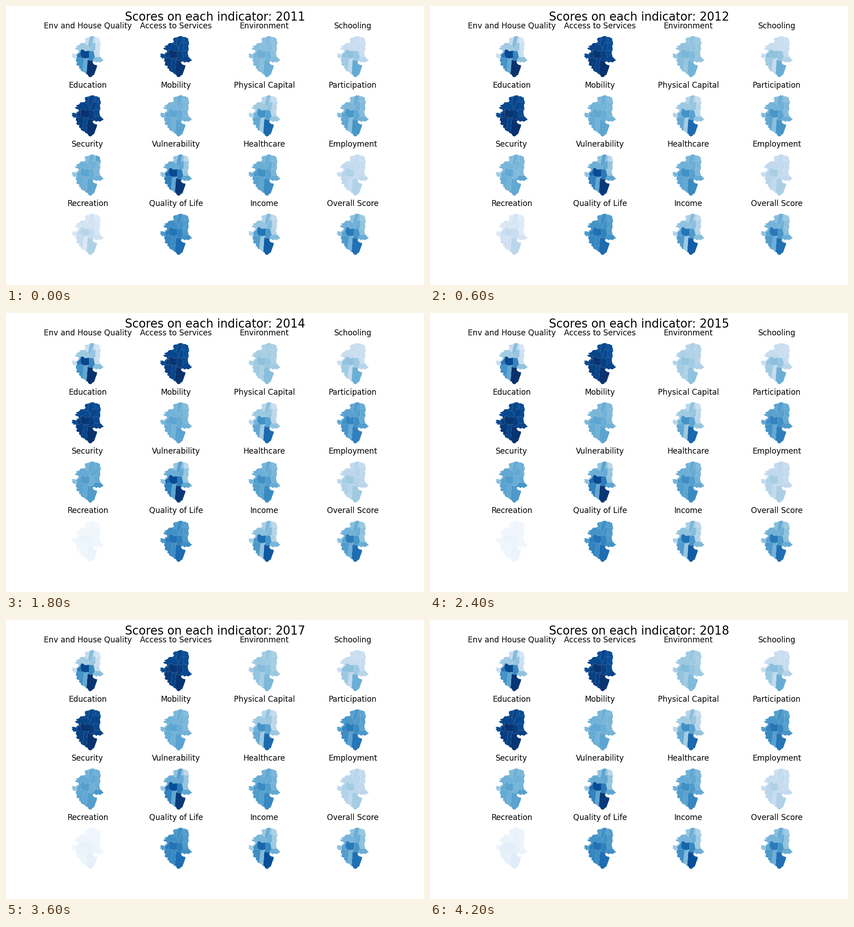
Write a matplotlib script that moves like this. It is 917 px wide and 611 px high and loops after 4800 ms.

```python
import numpy as np
import matplotlib.pyplot as plt
from matplotlib.animation import FuncAnimation
from matplotlib.collections import PolyCollection
from matplotlib.path import Path

WIDTH, HEIGHT = 917, 611
YEARS = range(2011, 2019)
LEFT, TOP = 144, 66
COL_STEP, ROW_STEP = 193.8, 129.7

# City border, clockwise from the north-west corner
EAST = [(29, 5), (33, 3), (37, 3), (38, 1.5), (41, 1.5), (42, 0), (49, 0),
        (51, 2), (56, 2), (59, 4), (62, 5), (62, 9), (63.5, 13), (64, 17),
        (62, 21), (62.5, 25), (63, 30), (61, 34), (61, 39), (62, 42),
        (63, 46), (66, 48), (67, 50.5), (70, 51.5), (69, 54), (66, 55),
        (64, 57), (61, 57.5), (58, 56), (54, 58), (50, 55), (46, 57),
        (47, 60), (50, 62.5), (56, 64), (55, 69)]
WEST = [(53, 74), (51, 80), (49, 85), (46, 86), (44, 89), (40, 90), (37, 88),
        (35, 84), (31, 83), (28, 79), (24, 78), (20, 75), (20, 72), (16, 70),
        (17, 65), (13, 65), (10, 62), (12, 58), (9, 54), (10, 49), (7, 48),
        (5, 50), (3, 46), (0, 45), (2, 42), (0, 39), (5, 38), (10, 40),
        (11, 37), (16, 34), (14, 30), (10, 30), (7, 26), (13, 25), (9, 22),
        (16, 20), (20, 15), (27, 15), (31, 12), (29, 9)]
BORDER = np.array(EAST + WEST, float)

# Corners shared by neighbouring districts; outer ones lie beyond the border
NODES = dict(
    A=(41, -3), B=(50, -3), C=(54, -3), D=(75, -3), E=(75, 17), F=(52, 14),
    G=(46, 15), H=(37, 14), I=(41, 27), J=(29, 16), K=(36, 20), L=(43, 20),
    M=(38, 32), N=(29, 33), O=(26, 30), P=(21, 29), Q=(17, 36), R=(19, 40),
    S=(22, 47), T=(30, 49), U=(38, 48), V=(48, 33), W=(52, 30), X=(75, 36),
    Y=(75, 46), Z=(51, 46), a=(46, 53), b=(46, 58), c=(41, 54), d=(35, 52),
    e=(27, 50), f=(22, 92), g=(32, 92), h=(75, 59), i=(75, 95), j=(11, 41),
    k=(12, 48), l=(-5, 52), m=(-5, 32), n=(-5, 10), o=(20, -3), p=(-5, 95))

# District: (corners, relative wealth)
DISTRICTS = dict(
    far_ne=("CDEF", .16), north=("BCFG", .22), east=("FEXW", .22),
    mid_north=("GFWVMIL", .40), strip=("ABGLIKH", .43), nw=("oAHKJ", .24),
    west=("noJKIMNOPQm", .37), mid_east=("WXYZV", .23),
    low_east=("ZYhba", .42), centre=("MVZacdU", .66),
    mid_west=("PONMUTSR", .90), inner_west=("PRSkjQ", .73),
    far_west=("mQjkl", .24), south=("dcabhig", .99),
    low_mid=("eTUdgf", .52), sw=("lkSTefp", .62))
NAMES = list(DISTRICTS)
WEALTH = np.array([w for _, w in DISTRICTS.values()])

# Indicator: (base level, gain on wealth, districts off the trend)
INDICATORS = {
    "Env and House Quality": (0, 1, {}),
    "Access to Services": (.86, .13, {}),
    "Environment": (.39, .12, dict(low_mid=.42)),
    "Schooling": (.15, .36, dict(low_mid=.26, mid_west=.42, mid_north=.23,
                                 strip=.23, west=.24)),
    "Education": (.875, .115, {}),
    "Mobility": (.43, .12, dict(strip=.50)),
    "Physical Capital": (.15, .6, dict(low_mid=.37, mid_west=.62, south=.78,
                                       inner_west=.48)),
    "Participation": (.39, .22, dict(low_mid=.43)),
    "Security": (.45, .09, dict(far_west=.38, nw=.44)),
    "Vulnerability": (.23, .74, dict(far_ne=.29, low_mid=.54)),
    "Healthcare": (.42, .23, {}),
    "Employment": (.205, .13, dict(low_mid=.25, centre=.25)),
    "Recreation": (.10, .22, dict(low_mid=.15)),
    "Quality of Life": (.53, .24, {}),
    "Income": (.16, .66, dict(low_mid=.38, mid_west=.73, inner_west=.56)),
    "Overall Score": (.31, .45, dict(low_mid=.49, inner_west=.56)),
}

# Change of the level by year
DRIFT = {
    "Environment": (0, -.03, -.05, -.08, -.11, -.06, -.06, -.06),
    "Participation": (0, .01, .10, .09, .09, .11, .12, .13),
    "Security": (0, -.01, .04, .04, .04, .04, .03, .01),
    "Employment": (0, .01, .05, .04, .02, .05, .03, .0),
    "Income": (0, .0, .03, .02, .01, .06, .06, .07),
    "Healthcare": (0, -.01, -.01, 0, 0, 0, .01, .01),
}
FADE = (1, .9, .17, .18, .2, .17, .25, .36)


def scores(name, step):
    """Colour values of all districts for one indicator in one year."""
    base, gain, special = INDICATORS[name]
    vals = base + gain * WEALTH
    for district, v in special.items():
        vals[NAMES.index(district)] = v
    if name == "Security":
        vals[NAMES.index("far_ne" if step == 0 else "low_east")] = .56
        if step:
            vals[NAMES.index("centre")] = .45
    if name == "Recreation":
        if step:
            vals[NAMES.index("low_mid")] = .23
        vals = vals * FADE[step]
    vals = vals + DRIFT.get(name, (0,) * len(YEARS))[step]
    seed = 100 * list(INDICATORS).index(name)
    lasting = np.random.default_rng(seed).uniform(-1, 1, len(vals))
    yearly = np.random.default_rng(seed + step + 1).uniform(-1, 1, len(vals))
    spread = .004 if name == "Recreation" and step > 1 else .01
    return np.clip(vals + spread * (.5 * lasting + yearly), 0, 1)


plt.rcParams["font.family"] = "DejaVu Sans"
fig = plt.figure(figsize=(WIDTH / 100, HEIGHT / 100), dpi=100,
                 facecolor="white")
ax = fig.add_axes([0, 0, 1, 1])
ax.set_xlim(0, WIDTH)
ax.set_ylim(HEIGHT, 0)
ax.axis("off")

heading = fig.text(.5, .98, "", fontsize=18.4, ha="center", va="top")
shapes = [np.array([NODES[c] for c in corners], float)
          for corners, _ in DISTRICTS.values()]
maps = {}
for i, name in enumerate(INDICATORS):
    row, col = divmod(i, 4)
    origin = np.array([LEFT + col * COL_STEP, TOP + row * ROW_STEP])
    ax.text(origin[0] + 35.1, origin[1] - 17, name, fontsize=12.27,
            ha="center", va="baseline")
    area = PolyCollection([s + origin for s in shapes], cmap="Blues",
                          linewidths=0, antialiaseds=True)
    area.set_clim(0, 1)
    ax.add_collection(area, autolim=False)
    area.set_clip_path(Path(BORDER + origin), ax.transData)
    maps[name] = area


def draw(step):
    heading.set_text(f"Scores on each indicator: {YEARS[step]}")
    for name, area in maps.items():
        area.set_array(scores(name, step))
    return [heading, *maps.values()]


anim = FuncAnimation(fig, draw, frames=len(YEARS), interval=600,
                     repeat=True, repeat_delay=0, blit=False)
plt.show()
```
